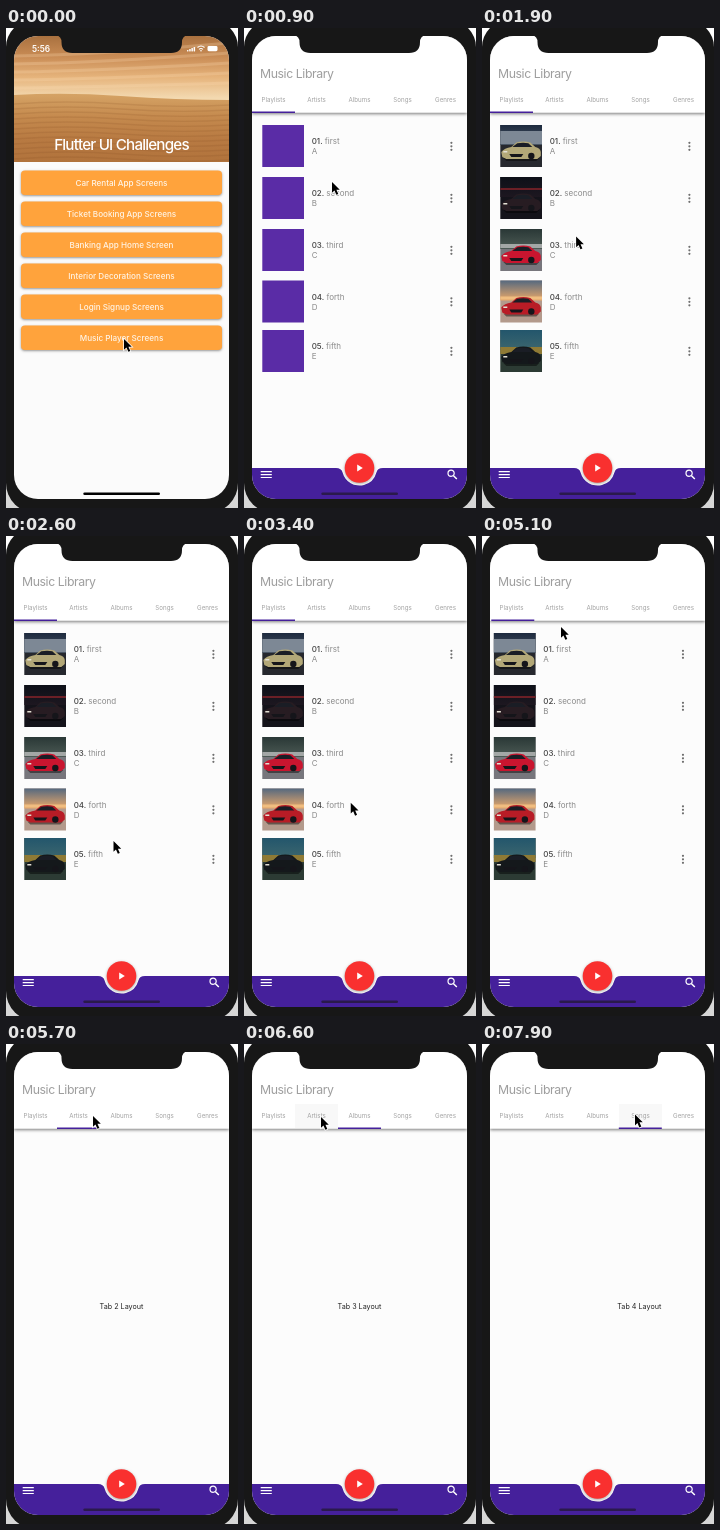
An HTML page with a canvas that plays this animation: 232 px wide and 480 px high, repeating every 8000 ms.

```html
<!DOCTYPE html>
<html lang="en">
<head>
<meta charset="utf-8">
<title>Music library demo</title>
<style>
html, body { margin: 0; width: 100%; height: 100%; overflow: hidden; background: #eee; }
canvas { display: block; width: 232px; height: 480px; }
</style>
</head>
<body>
<canvas></canvas>
<script>
const LOOP = 8000, LEFT = 8, WIDTH = 215, TAB = 43, MID = 115.5;
const PURPLE = '#45209b';
const canvas = document.querySelector('canvas');
const ctx = canvas.getContext('2d');
const ratio = window.devicePixelRatio || 1;
canvas.width = 232 * ratio;
canvas.height = 480 * ratio;

const buttons = ['Car Rental App', 'Ticket Booking App', 'Banking App Home', 'Interior Decoration', 'Login Signup', 'Music Player']
  .map((name, i) => name + (i === 2 ? ' Screen' : ' Screens'));
const tabs = ['Playlists', 'Artists', 'Albums', 'Songs', 'Genres'];
// band: colour, top and height of a stripe behind the car
const rows = [
  { y: 97, name: 'first', sky: ['#1d2a3e', '#4a5664'], ground: '#26282e', car: '#b3a878', band: ['#7d8895', 6, 13] },
  { y: 149, name: 'second', sky: ['#0d1018', '#1d1720'], ground: '#14131a', car: '#271c22', band: ['#6b1f26', 11, 2] },
  { y: 201, name: 'third', sky: ['#2a3836', '#4c5a55'], ground: '#77767c', car: '#c9152f', band: ['#a3a7a6', 15, 4] },
  { y: 252.5, name: 'forth', sky: ['#56697f', '#eaa868'], ground: '#b39a8c', car: '#b81c26', band: ['#f0bd80', 16, 3] },
  { y: 302, name: 'fifth', sky: ['#23566c', '#3c666e'], ground: '#2c3b34', car: '#14181b', band: ['#8f7a35', 17, 7] },
];
const slides = [
  { at: 5087, from: 0, to: 1, lag: 0 },
  { at: 6000, from: 1, to: 2, lag: 0 },
  { at: 6700, from: 2, to: 1, lag: 0 },
  { at: 7620, from: 1, to: 3, lag: 130 },
];
const presses = [[2, 5920, 6150], [1, 6480, 6780], [3, 7560, 8000]];
const pointer = [
  [0, 118, 311], [400, 118, 311], [900, 88, 154], [1400, 86, 150], [2600, 107.5, 305], [3100, 108, 296],
  [4300, 100, 110], [5100, 79, 91], [5400, 76, 73], [5600, 77, 72], [5900, 115, 72], [6100, 115, 73],
  [6450, 77, 73], [6900, 77, 73], [7500, 153, 71], [8000, 153, 70.5],
];

const clamp = v => Math.min(1, Math.max(0, v));
const mix = (a, b, p) => a + (b - a) * p;

// cubic-bezier(.25, .1, .25, 1)
function ease(x) {
  if (x <= 0 || x >= 1) return clamp(x);
  let lo = 0, hi = 1;
  for (let i = 0; i < 20; i++) {
    const s = (lo + hi) / 2;
    if (.75 * s * (1 - s) + s ** 3 < x) lo = s; else hi = s;
  }
  return .3 * lo * (1 - lo) ** 2 + 3 * lo * lo * (1 - lo) + lo ** 3;
}

function text(str, x, y, size, color, { weight = 400, align = 'left', spacing = 0 } = {}) {
  ctx.font = `${weight} ${size}px Inter, sans-serif`;
  ctx.letterSpacing = spacing + 'px';
  ctx.textAlign = align;
  ctx.fillStyle = color;
  ctx.fillText(str, x, y);
  return ctx.measureText(str).width;
}

function rect(x, y, w, h, color, radius = 0) {
  ctx.fillStyle = color;
  ctx.beginPath();
  ctx.roundRect(x, y, w, h, radius);
  ctx.fill();
}

function dot(x, y, r, color) {
  ctx.fillStyle = color;
  ctx.beginPath();
  ctx.arc(x, y, r, 0, 7);
  ctx.fill();
}

function shape(path, color) {
  ctx.fillStyle = color;
  ctx.fill(new Path2D(path));
}

function line(path, color, width) {
  ctx.strokeStyle = color;
  ctx.lineWidth = width;
  ctx.stroke(new Path2D(path));
}

function vertical(y0, y1, ...colors) {
  const g = ctx.createLinearGradient(0, y0, 0, y1);
  colors.forEach((c, i) => g.addColorStop(i / (colors.length - 1), c));
  return g;
}

function shadowed(blur, dy, color, draw) {
  ctx.save();
  ctx.shadowColor = color;
  ctx.shadowBlur = blur * ratio;
  ctx.shadowOffsetY = dy * ratio;
  draw();
  ctx.restore();
}

function desert() {
  rect(LEFT, 8, WIDTH, 64, vertical(8, 70, '#a9713f', '#c98c55', '#e6b47c', '#f3d9b0'));
  for (let i = 0; i < 5; i++) {
    const y = 24 + i * 8;
    line(`M8 ${y + 4} Q90 ${y + 3} 223 ${y - 9 + i * 2}`, 'rgba(250,220,180,.25)', 3);
  }
  const dunes = 'M8 67 Q60 64 115 68 T223 72 V134 H8Z';
  shape(dunes, vertical(66, 134, '#d5a365', '#c58a4e', '#b87a42', '#b1733c'));
  for (let i = 0; i < 12; i++) {
    const y = 76 + i * 5;
    line(`M8 ${y} Q60 ${y - 4} 115 ${y} T223 ${y + 1}`, 'rgba(120,70,30,.15)', 1.3);
  }
}

function home(t) {
  rect(LEFT, 8, WIDTH, 463, '#fbfbfb');
  desert();
  text('Flutter UI Challenges', MID, 122.4, 15.2, '#fff', { align: 'center', weight: 500, spacing: -.8 });
  buttons.forEach((label, i) => {
    const y = 142.5 + i * 31;
    shadowed(2.5, 1, 'rgba(0,0,0,.4)', () => rect(15, y, 201, 24.5, '#ffa33c', 4));
    if (i === 5 && t > 60 && t < 600) rect(15, y, 201, 24.5, 'rgba(110,60,0,.14)', 4);
    text(label, MID, y + 15.4, 8.12, '#fff4e6', { weight: 500, align: 'center' });
  });
}

function photo({ y, sky, ground, car, band }, loaded) {
  if (!loaded) return rect(18.3, y, 41.7, 42, '#5a2ca6');
  ctx.save();
  ctx.translate(18.3, y);
  rect(0, 0, 41.7, 42, ground);
  rect(0, 0, 41.7, 20, vertical(0, 20, ...sky));
  rect(0, band[1], 41.7, band[2], band[0]);
  shape('M3 33 H39 L36 36 H6Z', 'rgba(0,0,0,.45)');
  shape('M1 27 Q4 23 11 22 L16 17.500 Q23 15.500 30 17.500 L35 22 Q40 23 40.500 27 V31 L37 34 H6 L2 32Z', car);
  shape('M12 22 L17 18.300 Q23 17 28 18.300 L32 22Z', '#1a1d25');
  shape('M9 29 H23 L21 32 H11Z', '#15151a');
  dot(31, 31, 3.2, '#15151a');
  rect(3, 26, 4, 1.4, '#e4e0d4');
  ctx.restore();
}

function page(index, x, t) {
  ctx.save();
  ctx.translate(x, 0);
  if (index) {
    text(`Tab ${index + 1} Layout`, MID, 264.6, 7.2, '#222', { align: 'center' });
  } else {
    rows.forEach((row, i) => {
      photo(row, t >= 1100);
      const width = text(`0${i + 1}. `, 67.7, row.y + 19.2, 8, '#444', { weight: 500 });
      text(row.name, 67.7 + width, row.y + 19.2, 8, '#8a8a8a');
      text('ABCDE'[i], 67.7, row.y + 29.2, 8, '#8a8a8a');
      for (let k = -1; k < 2; k++) dot(207.4, row.y + 21.3 + k * 3.5, 1.1, '#707070');
    });
  }
  ctx.restore();
}

function bottomBar() {
  ctx.beginPath();
  ctx.moveTo(8, 440);
  ctx.lineTo(92, 440);
  ctx.quadraticCurveTo(97.5, 440, 98.6, 444.5);
  ctx.arc(MID, 440, 17.5, Math.PI - .26, .26, true);
  ctx.quadraticCurveTo(133.5, 440, 139, 440);
  ctx.lineTo(223, 440);
  ctx.lineTo(223, 471);
  ctx.lineTo(8, 471);
  ctx.fillStyle = PURPLE;
  ctx.fill();
  shadowed(3, 1, 'rgba(0,0,0,.35)', () => dot(MID, 440, 14.8, '#f9302f'));
  shape('M113.2 436.6 V443.6 L118.8 440.1Z', '#fff');
  line('M16.7 443.7 H27.8 M16.7 446.6 H27.8 M16.7 449.5 H27.8', '#fff', 1.2);
  line('M209.300 447.5 L212.800 451', '#fff', 1.5);
  line('M210.2 445.2 a3.1 3.1 0 1 0 -6.2 0 a3.1 3.1 0 1 0 6.2 0', '#fff', 1.2);
}

function library(t) {
  rect(LEFT, 8, WIDTH, 463, '#fcfcfc');
  const slide = slides.filter(s => t >= s.at).pop() || { at: 0, from: 0, to: 0, lag: 0 };
  const { from, to, at, lag } = slide;
  const moved = ease((t - at - lag) / 300), step = Math.sign(to - from);
  if (moved < 1) page(from, -step * moved * WIDTH, t);
  page(to, step * (1 - moved) * WIDTH, t);

  shadowed(3, 1, 'rgba(0,0,0,.5)', () => rect(LEFT, 8, WIDTH, 76.8, '#fff'));
  text('Music Library', 16, 50, 12.3, '#9e9e9e', { spacing: -.42 });
  presses.forEach(([tab, start, end]) => {
    if (t >= start && t < end) rect(LEFT + tab * TAB, 60, TAB, 24, '#f8f8f8');
  });
  tabs.forEach((label, i) => text(label, LEFT + (i + .5) * TAB, 73.8, 6.2, '#a2a2a2', { align: 'center' }));
  rect(LEFT + mix(from, to, ease((t - at) / 300)) * TAB, 83.6, TAB, 1.3, PURPLE);
  bottomBar();
}

function status() {
  text('5:56', 26, 23.6, 8.3, '#fff', { weight: 600 });
  for (let i = 0; i < 4; i++) rect(181 + i * 2.2, 22 - i, 1.5, 1.5 + i, '#fff', .4);
  line('M191.5 19.5 Q195 16.5 198.500 19.5 M193 21.3 Q195 19.6 197 21.3', '#fff', 1.1);
  dot(195, 22.8, .8, '#fff');
  rect(201.5, 18, 10, 5.2, '#fff', 1.4);
}

function cursor(t) {
  const i = pointer.findIndex(p => p[0] > t);
  const [t0, x0, y0] = pointer[i - 1], [t1, x1, y1] = pointer[i];
  const p = (t - t0) / (t1 - t0), s = p * p * (3 - 2 * p);
  ctx.save();
  ctx.translate(mix(x0, x1, s), mix(y0, y1, s));
  ctx.scale(.82, .82);
  const arrow = 'M0 0 V13.2 L3 10.4 L5.3 15.7 L7.7 14.700 L5.400 9.5 H9.5Z';
  line(arrow, '#fff', 1.8);
  shape(arrow, '#000');
  ctx.restore();
}

function draw(t) {
  ctx.setTransform(ratio, 0, 0, ratio, 0, 0);
  rect(0, 0, 232, 480, vertical(0, 480, '#fff', '#d6d6d6'));
  rect(0, -7, 232, 492, '#171717', [26, 26, 30, 30]);
  ctx.save();
  ctx.beginPath();
  ctx.roundRect(LEFT, 8, WIDTH, 463, 24);
  ctx.clip();

  const push = 1 - (1 - clamp((t - 200) / 400)) ** 3;
  if (push < 1) {
    ctx.save();
    ctx.translate(-push * WIDTH / 3, 0);
    home(t);
    ctx.restore();
  }
  if (push > 0) {
    ctx.save();
    ctx.translate((1 - push) * WIDTH, 0);
    if (push < 1) shadowed(8, 0, 'rgba(0,0,0,.25)', () => rect(LEFT, 8, WIDTH, 463, '#fff'));
    library(t);
    ctx.restore();
  }
  status();
  rect(77.3, 464.4, 76.7, 2.6, push < .5 ? '#000' : '#2a1a4c', 1.3);
  ctx.restore();
  shape('M50 7 Q55.500 8.500 55.500 14 Q55.500 25 66.500 25 H165 Q176 25 176 14 Q176 8.500 181.500 7Z', '#171717');
  cursor(t);
}

function frame(now) {
  draw(now % LOOP);
  requestAnimationFrame(frame);
}
requestAnimationFrame(frame);
</script>
</body>
</html>
```
